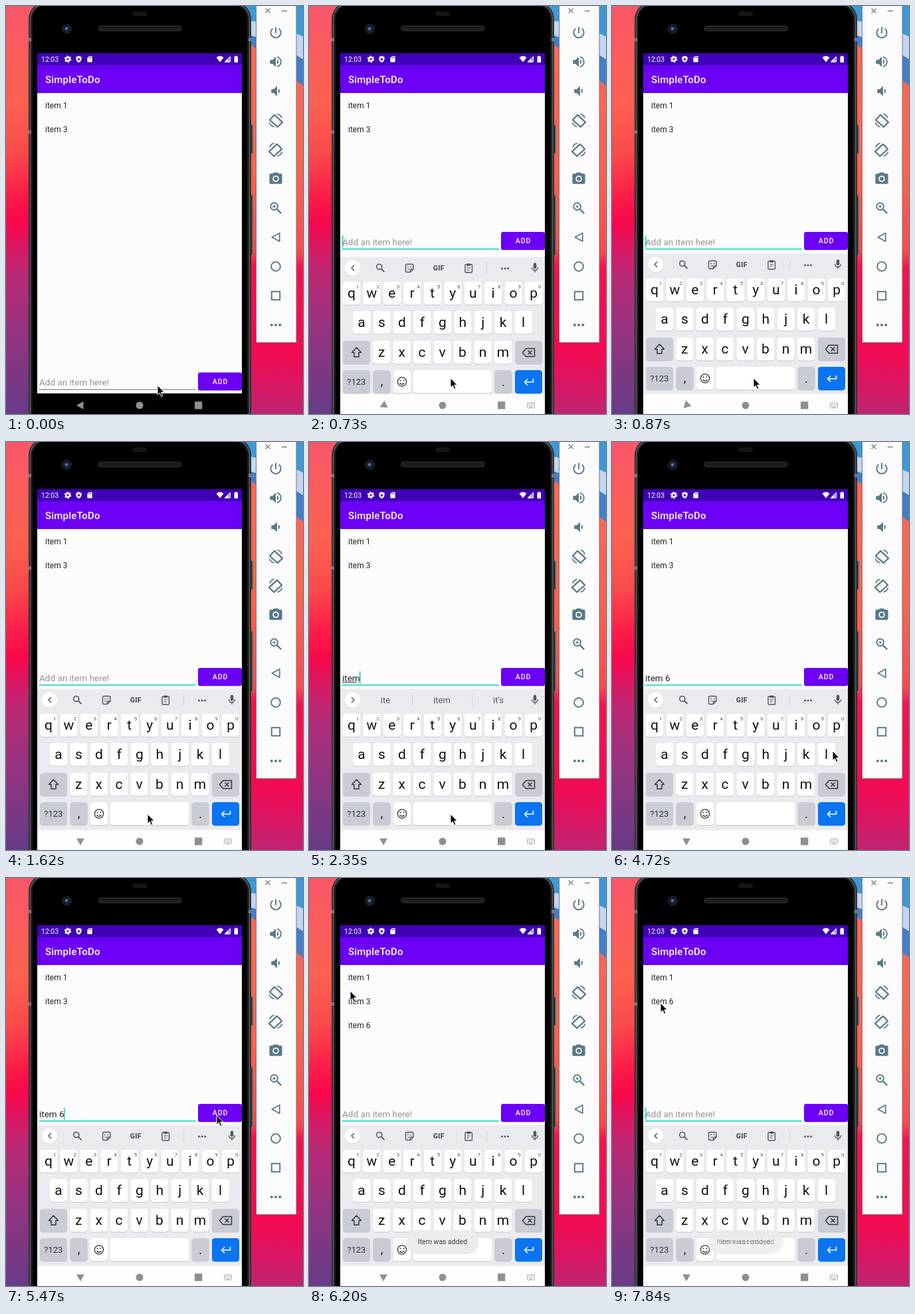
Recreate the animation shown at these times as an HTML page. Size 447 px wide and 614 px high, loop 7990 ms.

```html
<!DOCTYPE html>
<html lang="en">
<head>
<meta charset="utf-8">
<title>To-do list demo</title>
<style>
  html, body { margin: 0; width: 100%; height: 100%; overflow: hidden; background: #000; }
  svg { display: block; width: 447px; height: 614px; }
  text { font-family: Roboto, "Noto Sans", sans-serif; white-space: pre; }
</style>
</head>
<body>
<svg id="stage" viewBox="0 0 447 614"></svg>
<script>
const LOOP = 7990;
const stage = document.getElementById('stage');

// Markup helpers
const rect = (x, y, w, h, fill, r = 0, more = '') =>
  `<rect x="${x}" y="${y}" width="${w}" height="${h}" rx="${r}" fill="${fill}" ${more}/>`;
const disc = (x, y, r, fill, more = '') => `<circle cx="${x}" cy="${y}" r="${r}" fill="${fill}" ${more}/>`;
const path = (d, fill, more = '') => `<path d="${d}" fill="${fill}" ${more}/>`;
const pen = (color, w) => `stroke="${color}" stroke-width="${w}"`;
const line = (d, color, w = 2) => path(d, 'none', pen(color, w) + ' stroke-linejoin="round"');
const label = (s, x, y, size, fill, more = '') =>
  `<text x="${x}" y="${y}" font-size="${size}" fill="${fill}" ${more}>${s}</text>`;
const mid = 'text-anchor="middle"';
const group = (id, body) => `<g id="${id}">${body}</g>`;
const icon = (x, y, size, body) =>
  `<g transform="translate(${x} ${y}) scale(${size / 24}) translate(-12 -12)">${body}</g>`;
const ramp = (id, stops, dir) => `<linearGradient id="${id}" gradientUnits="userSpaceOnUse" ${dir}>` +
  stops.map(([o, c]) => `<stop offset="${o}" stop-color="${c}"/>`).join('') + '</linearGradient>';

function wallpaper() {
  return '<defs>' +
    ramp('warm', [[0, '#f9576a'], [.12, '#fb5c5c'], [.24, '#fc6150'], [.36, '#fa4a4b'], [.46, '#fb1f48'],
      [.53, '#f8074a'], [.58, '#dd1560'], [.65, '#bd2873'], [.78, '#983380'], [1, '#653b86']],
      'x1="0" y1="0" x2="110" y2="600"') +
    ramp('right', [[0, '#fb6a58'], [.4, '#fb6450'], [.6, '#fa4a4c'], [.64, '#f8114e'],
      [.84, '#f30a52'], [.92, '#dc1560'], [1, '#bd2672']], 'x1="440" y1="0" x2="400" y2="614"') +
    '<clipPath id="screen"><rect x="47" y="71" width="308" height="543"/></clipPath></defs>' +
    rect(0, 0, 250, 614, 'url(#warm)') +
    rect(250, 0, 197, 614, 'url(#right)') +
    path('M355 0H447V120L377 64L355 50Z', '#417fcd') +
    path('M355 0H447V80Q410 56 355 40Z', '#c2d6f3') +
    path('M355 0H447V46Q410 28 355 20Z', '#3a9ad8');
}

function phone() {
  const button = (y, h) => rect(367, y, 5, h, '#77787a', 1.5) + rect(368, y + 1.5, 2.5, h - 3, '#2b2c2c', 1);
  return button(178, 45) + button(284, 92) +
    rect(34, -6, 335, 660, '#2a2b2b', 26) +
    rect(35.7, -4.5, 331.6, 660, '#5c5d5e', 24.5) +
    rect(37.3, -3, 328.4, 660, '#1b1c1c', 23) +
    rect(40, -1, 323, 660, '#000', 21) +
    [48, 187].map(y => rect(34, y, 4, 5, '#77787a')).join('') +
    rect(365, 48, 4, 5, '#77787a') +
    rect(190, 8, 22, 7, '#141517', 3.5) +
    rect(138.5, 30, 126, 7.5, '#1b1c1c', 3.7, 'stroke="#303132"') +
    disc(91.5, 34.5, 7, '#15171c', 'stroke="#2b2d32"') +
    disc(91.5, 34.5, 4, '#1d2949') + disc(91, 34, 2, '#5b76b0');
}

function statusBar() {
  const gear = disc(12, 12, 6, 'none', pen('#fff', 5)) +
    disc(12, 12, 9.5, 'none', pen('#fff', 4) + ' stroke-dasharray="5 4.95"');
  const shield = path('M12 1L3 5v6c0 5.5 3.8 10.7 9 12 5.2-1.3 9-6.5 9-12V5z', '#fff') +
    path('M12 7l1.6 3.3 3.6.5-2.6 2.5.6 3.6-3.2-1.7-3.2 1.7.6-3.6-2.6-2.5 3.6-.5z', '#3c00b5');
  const card = path('M18 2h-8L4 8v12a2 2 0 0 0 2 2h12a2 2 0 0 0 2-2V4a2 2 0 0 0-2-2z', '#fff') +
    line('M10.5 5v4M13.5 5v4M16.5 5v4', '#3c00b5', 1.6);
  return rect(47, 71, 308, 18, '#3f00b6') +
    label('12:03', 53, 84, 10.5, '#fff') +
    icon(93, 80, 11, gear) + icon(109.5, 80, 11, shield) + icon(126, 80, 11, card) +
    path('M316.5 77.5Q322 73 327.5 77.5L322 84.5Z', '#fff') +
    path('M329 84.5L338 75.5V84.5Z', '#fff', 'opacity=".5"') +
    path('M329 84.5L334.5 79V84.5Z', '#fff') + line('M329.5 84L337.5 76V84Z', '#fff', 1) +
    rect(343.5, 76, 5.5, 9, '#fff', .6) + rect(345, 75, 2.5, 2, '#fff');
}

function app() {
  const item = (id, s, y) => label(s, 59, y, 12, '#242424', `id="${id}"`);
  return rect(47, 71, 308, 513, '#fcfcfc') + statusBar() +
    rect(47, 89, 308, 42, '#6b00f5') +
    label('SimpleToDo', 59, 116, 15, '#fff', 'font-weight="500" letter-spacing=".19"') +
    item('row1', 'item 1', 153.5) + item('row2', 'item 3', 189.5) + item('row3', 'item 6', 225.5) +
    group('form',
      label('Add an item here!', 50, 359.5, 13.5, '#949494', 'id="hint"') +
      label('', 50, 359.5, 13.5, '#242424', 'id="typed"') +
      rect(50, 361, 0, 1, '#333', 0, 'id="compose"') +
      rect(50, 365, 236, 1.5, '#12cfc0', 0, 'id="rule"') +
      rect(50, 345.5, 1.5, 18, '#08d3c0', 0, 'id="caret"') +
      rect(289, 341, 66, 27, '#9b9b9b', 3, 'opacity=".4"') +
      rect(289, 340, 66, 27, '#6b00f5', 3, 'id="add"') +
      label('ADD', 322.5, 357.3, 10.5, '#fff', mid + ' font-weight="500" letter-spacing=".94"'));
}

const INK = '#51565c', DARK = '#33373b';

function tools() {
  return line('M68 384L64 388L68 392', INK, 1.5) +
    disc(105.8, 386.5, 4, 'none', pen(INK, 1.6)) + line('M108.8 389.5L113.5 394.2', INK, 1.8) +
    line('M147.5 382.5H155Q157 382.5 157 384.5V390L152.5 394.5H147.5Q145.5 394.5 145.5 392.5V384.5Q145.5 382.5 147.5 382.5ZM157 390H154.5Q152.5 390 152.5 392V394.5', INK, 1.4) +
    disc(149, 386.5, .9, INK) + disc(153.5, 386.5, .9, INK) + line('M148.5 389.5Q150 391 152 389.8', INK, 1) +
    label('GIF', 195.3, 392, 10.5, INK, mid + ' font-weight="900" letter-spacing=".3"') +
    rect(235, 383, 10.5, 12, 'none', 1, pen(INK, 1.4)) + rect(237.5, 381.5, 5.5, 3.5, INK, 1) +
    line('M237.5 388H243M237.5 391H241.5', INK, 1.2) +
    rect(267, 380, 1, 17, '#cfd2d6') +
    [290.5, 295, 299.5].map(x => disc(x, 389, 1.5, INK)).join('');
}

function words() {
  return line('M64 384L68 388L64 392', INK, 1.5) +
    [155, 245].map(x => rect(x, 379, 1, 18, '#cfd2d6')).join('') +
    [115, 200, 285].map((x, i) => label('', x, 392.7, 13, INK, `${mid} id="word${i}"`)).join('');
}

function keys() {
  const key = (x, y, w, fill = '#fff') => rect(x, y + 1, w, 34.5, '#c3c6cb', 4.5) + rect(x, y, w, 34.5, fill, 4.5);
  const grey = '#c9ccd2';
  const row = (letters, first, y, digits) => [...letters].map((c, i) => {
    const x = first + 30.45 * i;
    return key(x - 13, y, 26.2) + label(c, x, y + 24.3, 21, '#111', mid) +
      (digits ? label((i + 1) % 10, x + 9.2, y + 10, 8, INK, mid) : '');
  }).join('');
  return row('qwertyuiop', 64, 409, true) + row('asdfghjkl', 79, 453) + row('zxcvbnm', 109.2, 498) +
    key(51, 498, 41, grey) + line('M71.5 508L64.5 515.5H68V522H75V515.5H78.5Z', DARK, 1.5) +
    key(310, 498, 41, grey) +
    line('M326.5 509.5H339.5V521.5H326.5L321.5 515.5ZM329.5 512.5L335.5 518.5M335.5 512.5L329.5 518.5', DARK, 1.5) +
    key(51, 542, 41, grey) + label('?123', 71.3, 564, 13, DARK, mid) +
    key(96.5, 542, 26, grey) + label(',', 109.5, 565, 19, '#222', mid) +
    key(127, 542, 26) + disc(140, 559.5, 6.6, 'none', pen(DARK, 1.3)) +
    disc(137.6, 557.5, 1, DARK) + disc(142.4, 557.5, 1, DARK) + line('M136.5 561.3Q140 565.3 143.5 561.3', DARK, 1.3) +
    key(157, 542, 118) +
    key(279.5, 542, 26, grey) + label('.', 292.5, 566, 19, '#222', mid) +
    rect(310, 542, 41, 35.5, '#0b74f1', 4.5) + line('M337.5 555V560H325M329 555.5L324.5 560L329 564.5', '#fff', 1.6);
}

function keyboard() {
  const mic = path('M12 14a3 3 0 0 0 3-3V5a3 3 0 0 0-6 0v6a3 3 0 0 0 3 3z', INK) +
    line('M6 11a6 6 0 0 0 12 0M12 17V21', INK, 1.9);
  return group('board', rect(47, 371.5, 308, 260, '#e9ebef') +
    disc(65.5, 388.8, 11.5, '#cfd2d6') + disc(65.5, 388, 11.5, '#fff') +
    group('tools', tools()) + group('words', words()) + icon(340, 388, 18, mic) + keys());
}

function navBar() {
  const c = '#8f8f8f', light = '#a3a3a3';
  const dots = [0, 1, 2, 3].map(i => rect(329.7 + i * 2.5, 598.5, 1.3, 1.2, light) + rect(329.7 + i * 2.5, 600.8, 1.3, 1.2, light)).join('');
  return rect(47, 583, 308, 31, '#000', 0, 'id="nav"') +
    group('back', path('M-6 0L4.5 -6V6Z', c)) +
    disc(201, 601, 5.5, c) + rect(284, 595.3, 11.3, 11.3, c) +
    group('switch', rect(328.5, 597, 11, 8, 'none', 1, pen(light, .8)) + dots + rect(331.5, 603, 5, 1, light));
}

function toasts() {
  const toast = (id, s, w) => group(id, rect(201 - w / 2, 529.5, w, 36.5, '#ececed', 18) +
    label(s, 201, 551.2, 10.5, '#3c3c3c', mid));
  return toast('toast1', 'Item was added', 109) + toast('toast2', 'Item was removed', 116);
}

function panel() {
  const c = '#587886';
  const rotate = line('M10 3.5L22.5 15L15 22.5L2.5 11.5Z', c, 2.3) +
    line('M14.5 2.2Q19.5 3 21.5 8.5M2 15.5Q3.5 21 9.5 22.2', c, 1.8);
  const horn = dx => path(`M${3 + dx} 9v6h4l5 5V4l-5 5z`, c);
  const glyphs = [
    line('M12 3V13', c, 2) + line('M16.8 5.7A8 8 0 1 1 7.2 5.7', c, 2),
    horn(0) + path('M14 8a4.5 4.5 0 0 1 0 8z', c) + line('M14 4.3A7.9 7.9 0 0 1 14 19.7', c, 2),
    horn(2) + path('M16 8a4.5 4.5 0 0 1 0 8z', c),
    rotate,
    `<g transform="matrix(-1 0 0 1 24 0)">${rotate}</g>`,
    path('M9 2L7.2 4H4a2 2 0 0 0-2 2v12a2 2 0 0 0 2 2h16a2 2 0 0 0 2-2V6a2 2 0 0 0-2-2h-3.2L15 2z', c) +
      disc(12, 12, 5, '#fbfbfb') + disc(12, 12, 3.1, c),
    disc(9.5, 9.5, 5.6, 'none', pen(c, 2)) + line('M13.8 13.8L20.5 20.5', c, 2.4) + line('M7 9.5H12M9.5 7V12', c, 1.3),
    line('M18 5.5V18.5L6 12Z', c, 1.8),
    disc(12, 12, 7.2, 'none', pen(c, 2)),
    rect(5.5, 5.5, 13, 13, 'none', 0, pen(c, 2)),
    [5.5, 12, 18.5].map(x => disc(x, 12, 2.1, c)).join('')
  ];
  return rect(376.5, -4, 60.5, 510.5, '#fbfbfb', 1, pen('#777', 1)) +
    line('M390.5 3.5L397.5 10.5M397.5 3.5L390.5 10.5M415 7.5H423', '#7c8286', 1.4) +
    glyphs.map((g, i) => icon(406, 40 + 44 * i, 23, g)).join('');
}

stage.innerHTML = wallpaper() + phone() +
  `<g clip-path="url(#screen)">${app()}${keyboard()}${navBar()}${toasts()}</g>` + panel() +
  group('mouse', path('M0 0V14.2L3.3 11.2L5.6 16.6L7.9 15.6L5.6 10.3H10Z', '#000', pen('#fff', 1)));

const el = {};
stage.querySelectorAll('[id]').forEach(n => el[n.id] = n);

// Timelines: [start in ms, values...], each value holds until the next row
const MOUSE = [[0, 228, 571], [300, 225, 569], [450, 218, 564], [580, 213, 560],
  [3840, 150, 576], [3990, 64, 552], [4130, 230, 560], [4280, 361, 540], [4420, 336, 505],
  [4720, 332, 465], [4870, 325, 410], [5010, 319, 372], [5160, 317, 357],
  [5900, 240, 290], [6050, 120, 200], [6200, 62, 170], [6350, 36, 158], [6500, 46, 168], [6650, 66, 182], [6800, 73, 188]];
const SLIDE = [[0, 260], [300, 150], [450, 70], [580, 25], [730, 6], [870, 1], [1020, 0]];
const TURN = [[0, 0], [580, -10], [730, -25], [870, -45], [1020, -90]];
const TYPED = [[0, 0], [1920, 1], [2060, 2], [2210, 3], [2350, 4], [2500, 5], [3240, 6], [5760, 0]];
const UNDERLINE = [[0, 0], [2060, 3], [2210, 8], [2350, 21], [2500, 27], [2790, 0]];
const CARET = [[0, 0], [150, 1], [1620, 0], [1920, 1], [3990, 0], [4420, 1], [4720, 0], [5160, 1],
  [5760, 0], [6350, 1], [6800, 0], [7390, 1]];
const WORDS = [[0], [2060, 'i', 'I', 'it'], [2210, 'it', 'its', "it's"],
  [2350, 'ite', 'item', "it's"], [2500, 'item', 'items', 'them'], [2790]];
const ADDED = [[0, 0], [6050, .5], [6200, 1], [7690, .75], [7840, .6]];
const REMOVED = [[0, 0], [7690, .25], [7840, .45]];
const CARET_X = [0, 3.2, 7.5, 14.7, 26, 29.3, 37];

const at = (rows, t) => rows.findLast(r => r[0] <= t).slice(1);
const set = (node, attrs) => { for (const k in attrs) node.setAttribute(k, attrs[k]); };
const show = (node, opacity) => set(node, { opacity: +opacity });

function draw(t) {
  const up = t >= 300, focused = t >= 150, gone = t >= 7540;
  const [x, y] = at(MOUSE, t), [n] = at(TYPED, t), suggest = at(WORDS, t);
  set(el.mouse, { transform: `translate(${x} ${y})` });
  set(el.form, { transform: `translate(0 ${up ? 0 : 211.5})` });
  set(el.board, { transform: `translate(0 ${at(SLIDE, t)[0]})` });
  set(el.back, { transform: `translate(112 601) rotate(${at(TURN, t)[0]})` });
  set(el.nav, { fill: up ? '#fdfdfd' : '#000', y: up ? 584 : 583 });
  show(el.board, up);
  show(el.switch, up);

  set(el.rule, { fill: focused ? '#12cfc0' : '#999' });
  set(el.compose, { width: at(UNDERLINE, t)[0] });
  set(el.caret, { x: 50 + CARET_X[n], opacity: at(CARET, t)[0] });
  set(el.add, { fill: t >= 5620 && t < 5900 ? '#8128f7' : '#6b00f5' });
  el.typed.textContent = 'item 6'.slice(0, n);
  show(el.hint, !n);

  show(el.words, suggest.length > 0);
  show(el.tools, !suggest.length);
  for (let i = 0; i < 3; i++) el['word' + i].textContent = suggest[i] || '';

  el.row2.textContent = gone ? 'item 6' : 'item 3';
  show(el.row3, t >= 5900 && !gone);
  show(el.toast1, at(ADDED, t)[0]);
  show(el.toast2, at(REMOVED, t)[0]);
}

const start = performance.now();
function tick() {
  draw((performance.now() - start) % LOOP);
  requestAnimationFrame(tick);
}
tick();
</script>
</body>
</html>
```
